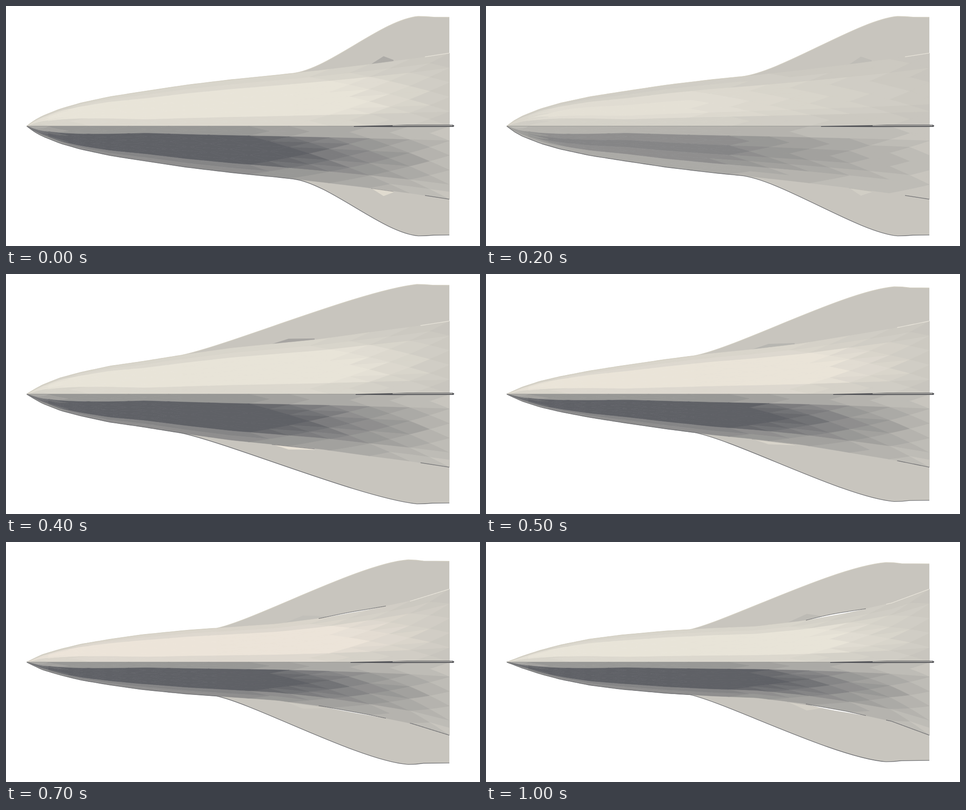
Recreate the animation shown at these times as an HTML page with a canvas. Size 1052 by 532 pixels, loop 2000 ms.

```html
<!DOCTYPE html>
<html lang="en">
<head>
<meta charset="utf-8">
<title>Spaceplane shape study</title>
<style>
html, body { margin: 0; width: 100%; height: 100%; overflow: hidden; background: #fff; }
canvas { display: block; }
</style>
</head>
<body>
<canvas id="stage" width="1052" height="532"></canvas>
<script>
const ctx = document.getElementById('stage').getContext('2d');
const MID = 266.3, NOSE = 46, TAIL = 984, COL = 44.5, ROWS = 10;
const LOOP = 2000, STEP = 100, LAST = 10;

// Half widths of the fuselage at these stations
const STATIONS = [46, 62, 80, 120, 165, 230, 300, 400, 500, 600, 700, 800, 900, 984];
const wide = [0, 12, 22, 38, 51, 65, 76, 91, 103, 113, 124, 136, 149, 162];
const lean = [0, 10, 20, 36, 48, 62, 72, 88, 102, 112, 122, 136, 149, 162];
const sharp = [0, 5, 11, 21, 30, 41, 53, 66, 78, 88, 102, 121, 141, 162];
const blunt = [0, 11, 22, 36, 49, 60, 68, 75, 77, 81, 93, 110, 131, 162];
const ogive = [0, 6, 13, 26, 38, 51, 60, 69, 75, 79, 91, 109, 131, 162];

// wing: root x, two control points, tip point, end y
// tone: light amount, light fade start, dark amount, warmth
// rear: fin start, seam start, slit start, slit width
// notch: left, peak, right, height, opacity
const POSES = [
  { at: 0, body: wide, wing: [638, 720, 138, 835, 30, 915, 23, 25],
    tone: [1.25, 700, 1.25, 0], rear: [772, 930, 700, 0], notch: [810, 838, 860, 14, 0.7] },
  { at: 1, body: wide, wing: [622, 710, 146, 835, 30, 915, 23, 25],
    tone: [0.88, 480, 0.68, 0], rear: [750, 930, 700, 0], notch: [806, 832, 856, 14, 0.5] },
  { at: 3, body: wide, wing: [510, 600, 148, 820, 30, 912, 23, 25],
    tone: [0.8, 450, 0.55, 0], rear: [737, 930, 700, 0], notch: [806, 832, 856, 14, 0] },
  { at: 4, body: lean, wing: [390, 500, 156, 790, 36, 912, 23, 25],
    tone: [1.25, 700, 1.25, 0], rear: [776, 920, 700, 0], notch: [590, 627, 685, 8, 0.9] },
  { at: 6, body: sharp, wing: [535, 620, 168, 805, 38, 900, 33.5, 37],
    tone: [1.25, 680, 1.3, 0.8], rear: [765, 905, 700, 0], notch: [590, 627, 685, 8, 0] },
  { at: 8, body: blunt, wing: [400, 490, 176, 770, 56, 885, 45.5, 48.5],
    tone: [1.25, 690, 1.25, 1], rear: [764, 888, 688, 3.5], notch: [645, 692, 735, 14, 0.3] },
  { at: 10, body: ogive, wing: [452, 535, 176, 775, 54, 888, 45.5, 48.5],
    tone: [1.25, 690, 1.28, 0], rear: [764, 888, 710, 3], notch: [668, 712, 745, 14, 0.3] }
];

// Shading strength from the spine outwards
const LIT = [0.45, 0.45, 0.85, 1, 1, 0.97, 0.9, 0.85, 0.45, 0.35];
const SHADE = [0.35, 0.35, 0.86, 0.9, 1, 1, 0.9, 0.82, 0.5, 0.42];
const BASE = [200, 197, 190], DARK = [95, 97, 102], PALE = [232, 228, 216], WARM = [236, 228, 217];

const clamp = (v, a = 0, b = 1) => Math.min(b, Math.max(a, v));
const mix = (a, b, k) => a + (b - a) * k;
const mixAll = (a, b, k) => a.map((v, i) => mix(v, b[i], k));
const rgb = c => `rgb(${c.map(Math.round).join()})`;

function poseAt(n) {
  const i = POSES.findIndex(p => p.at >= n), b = POSES[i];
  if (b.at === n) return b;
  const a = POSES[i - 1], k = (n - a.at) / (b.at - a.at), out = {};
  for (const key of ['body', 'wing', 'tone', 'rear', 'notch']) out[key] = mixAll(a[key], b[key], k);
  return out;
}

function halfWidth(pose, x) {
  x = clamp(x, NOSE, TAIL);
  const i = Math.max(1, STATIONS.findIndex(s => s >= x));
  const k = (x - STATIONS[i - 1]) / (STATIONS[i] - STATIONS[i - 1]);
  return mix(pose.body[i - 1], pose.body[i], k);
}

function surface(pose, side, x, v) {
  x = clamp(x, NOSE, TAIL);
  const power = clamp(0.5 + (x - 90) / 440, 0.45, 1);
  return [x, MID + side * halfWidth(pose, x) * Math.pow(v, power)];
}

function edge(pose, side, from, to, lift = () => 0) {
  const pts = [];
  for (let i = 0; i <= 60; i++) {
    const x = mix(from, to, i / 60);
    pts.push([x, MID + side * (halfWidth(pose, x) + lift(i / 60))]);
  }
  return pts;
}

function trace(pts) {
  ctx.beginPath();
  pts.forEach(p => ctx.lineTo(p[0], p[1]));
}

function fill(pts, color) {
  trace(pts);
  ctx.fillStyle = color;
  ctx.fill();
}

function line(pts, color, width) {
  trace(pts);
  ctx.strokeStyle = color;
  ctx.lineWidth = width;
  ctx.stroke();
}

function wingPath(pose, side) {
  const [root, x1, y1, x2, y2, tipX, tipY, endY] = pose.wing;
  const y = v => side < 0 ? v : 2 * MID - v;
  ctx.lineTo(root, MID + side * halfWidth(pose, root));
  ctx.bezierCurveTo(x1, y(y1), x2, y(y2), tipX, y(tipY));
  ctx.quadraticCurveTo(tipX + 18, y(tipY), tipX + 34, y(mix(tipY, endY, 0.8)));
  ctx.lineTo(TAIL, y(endY));
}

function drawWing(pose, side) {
  ctx.beginPath();
  wingPath(pose, side);
  ctx.lineTo(TAIL, MID);
  ctx.lineTo(pose.wing[0], MID);
  ctx.fillStyle = rgb(BASE);
  ctx.fill();
}

function drawNotch(pose, side) {
  const [left, peak, right, height, alpha] = pose.notch;
  const at = (x, d) => [x, MID + side * (halfWidth(pose, x) + d)];
  ctx.globalAlpha = alpha;
  fill([at(left, 0), at(peak, height), at(right, 3), at(right, -2)], side < 0 ? '#a3a29f' : '#ebe5d8');
  if (side > 0) line([at(left, 0.5), at(right, 1)], '#77777a', 1.2);
  ctx.globalAlpha = 1;
}

function facetColor(pose, side, x, row) {
  const [light, start, dark, warm] = pose.tone;
  const from = side < 0 ? start : 520;
  const fade = 1 - 0.92 * clamp((x - from) / (TAIL - from));
  const nose = Math.min(1, 0.6 + Math.max(0, x - NOSE) / 250);
  const raw = (side < 0 ? light * LIT[row] : dark * SHADE[row]) * fade * nose;
  const levels = side < 0 ? 8 : 11;
  const k = Math.round(clamp(raw) * levels) / levels;
  return rgb(mixAll(BASE, side < 0 ? mixAll(PALE, WARM, warm) : DARK, k));
}

function drawBody(pose, side) {
  const cols = Math.ceil((TAIL - NOSE) / COL);
  for (let row = 0; row < ROWS; row++) {
    for (let i = 0; i <= cols; i++) {
      const flip = (i + row) % 2 === 0;
      const foot = flip ? row + 1 : row, apex = flip ? row : row + 1;
      const corners = [[i - 1, foot], [i + 1, foot], [i, apex]];
      const pts = [];
      corners.forEach((a, n) => {
        const b = corners[(n + 1) % 3];
        for (let k = 0; k < 1; k += 0.125) {
          pts.push(surface(pose, side, TAIL - COL * mix(a[0], b[0], k), mix(a[1], b[1], k) / ROWS));
        }
      });
      const color = facetColor(pose, side, TAIL - COL * i, row);
      fill(pts, color);
      line(pts.concat([pts[0]]), color, 0.7);
    }
  }
}

function drawEdges(pose, side) {
  const [, seam, slit, gap] = pose.rear;
  const up = side < 0;
  if (gap > 0.1) {
    const inner = edge(pose, side, slit, 843);
    const outer = edge(pose, side, slit, 843, u => gap * Math.sin(Math.PI * u));
    fill(inner.concat(outer.slice().reverse()), '#fff');
    line(up ? outer : inner, '#5d5d5f', 1);
  }
  line(edge(pose, side, seam, TAIL), up ? '#e8e4da' : '#747476', 1.4);
  ctx.beginPath();
  edge(pose, side, NOSE, pose.wing[0]).forEach(p => ctx.lineTo(p[0], p[1]));
  wingPath(pose, side);
  ctx.strokeStyle = up ? '#d3cfc2' : '#707174';
  ctx.lineWidth = 1.4;
  ctx.stroke();
}

function drawFin(start) {
  line([[NOSE, MID], [start, MID]], '#8d8d8b', 0.8);
  fill([[start, 266], [855, 264.2], [890, 263.3], [992, 263.3], [995, 265.5],
    [993, 268], [858, 268.3], [start, 267.8]], '#525357');
  line([[858, 265.3], [991, 265.3]], '#bcbab4', 1.4);
}

function draw(n) {
  const pose = poseAt(n);
  ctx.fillStyle = '#fff';
  ctx.fillRect(0, 0, 1052, 532);
  ctx.lineJoin = 'round';
  for (const side of [-1, 1]) {
    drawWing(pose, side);
    drawNotch(pose, side);
    drawBody(pose, side);
    drawEdges(pose, side);
  }
  line([[TAIL, 104], [TAIL, 428]], '#bebbb4', 1);
  drawFin(pose.rear[0]);
}

let shown = -1;
const begin = performance.now();
function tick() {
  const n = Math.min(LAST, Math.floor(((performance.now() - begin) % LOOP) / STEP));
  if (n !== shown) draw(shown = n);
  requestAnimationFrame(tick);
}
tick();
</script>
</body>
</html>
```
